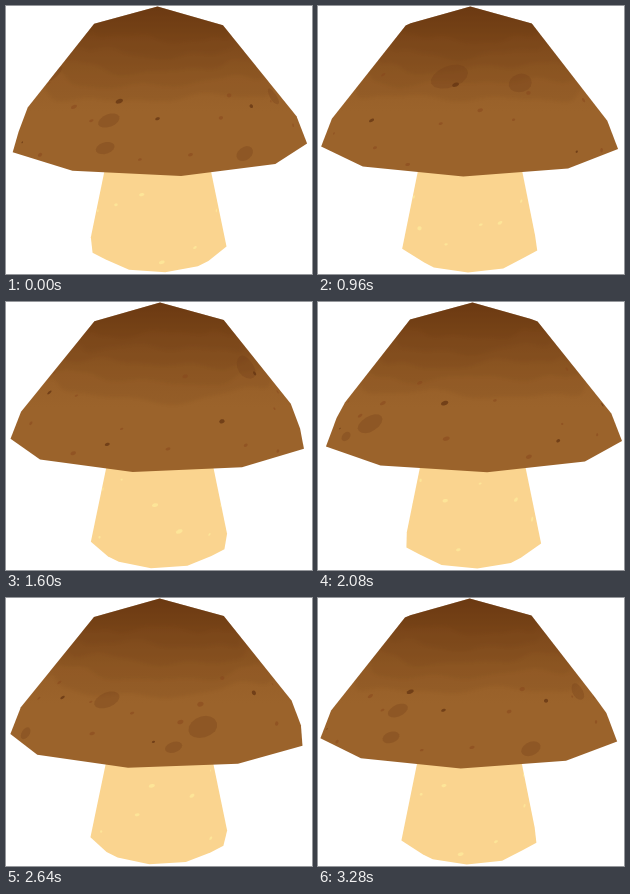
Recreate the animation shown at these times as an HTML page with a canvas. Size 306 by 268 pixels, loop 3360 ms.

```html
<!DOCTYPE html>
<html lang="en">
<head>
<meta charset="utf-8">
<title>Turning mushroom</title>
<style>
  html, body { margin: 0; width: 100%; height: 100%; overflow: hidden; background: #fff; }
  canvas { display: block; }
</style>
</head>
<body>
<canvas id="stage" width="306" height="268"></canvas>
<script>
const ctx = document.getElementById('stage').getContext('2d');
const RAD = Math.PI / 180, SIDES = 10, DISTANCE = 735, HORIZON = -25;
const STEP = 80, LOOP = 3360;

// Profiles from top to bottom: [radius, depth below the horizon]
const CAP = [[0, 25.5], [65.5, 43.5], [136.6, 130.7], [146.6, 156.5]];
const STEM = [[41.6, 130], [69, 260.8], [55.5, 269.5]];

// Large faint patches on the cap: [angle, depth, size]
const PATCHES = [[-109, 83, 16], [-73, 89, 12], [-19, 117, 9], [-18, 137, 8],
                 [31, 144, 9], [67, 108, 11], [94, 141, 7], [105, 127, 13]];

let seed = 11;
function random(from, to) {
  seed = (seed * 16807) % 2147483647;
  return from + (to - from) * seed / 2147483647;
}

const scatter = (count, top, bottom, color) => Array.from({ length: count }, (_, i) => ({
  angle: (i + random(0, 0.8)) * 360 / count * RAD,
  depth: random(top, bottom),
  size: random(1.3, 3.2),
  color: color(i)
}));

const capSpots = [
  ...PATCHES.map(([angle, depth, size]) =>
    ({ angle: angle * RAD, depth, size, color: 'rgba(112, 62, 24, 0.3)' })),
  ...scatter(34, 86, 150, i => i % 4 ? 'rgba(136, 70, 28, 0.5)' : 'rgba(100, 52, 18, 0.75)')
];
const stemSpots = scatter(14, 190, 258, () => '#fde598');

function radiusAt(profile, depth) {
  const i = Math.max(1, profile.findIndex(ring => ring[1] >= depth));
  const [r0, d0] = profile[i - 1], [r1, d1] = profile[i];
  return r0 + (r1 - r0) * (depth - d0) / (d1 - d0);
}

const centre = turn => 152.9 - 1.6 * Math.cos((turn - 30) * RAD);

// One step turns 8.2 degrees; the last part of the loop runs faster
function turnAt(step) {
  return step * 8.2 + Math.max(0, step - 33) * 1.7;
}

function project(radius, depth, angle, cx) {
  const scale = 1 / (1 - radius * Math.cos(angle) / DISTANCE);
  return [cx + radius * Math.sin(angle) * scale, HORIZON + depth * scale];
}

function hull(points) {
  points.sort((a, b) => a[0] - b[0] || a[1] - b[1]);
  const half = list => {
    const out = [];
    for (const p of list) {
      while (out.length > 1) {
        const [a, b] = out.slice(-2);
        if ((b[0] - a[0]) * (p[1] - a[1]) - (b[1] - a[1]) * (p[0] - a[0]) > 0) break;
        out.pop();
      }
      out.push(p);
    }
    return out.slice(0, -1);
  };
  return [...half(points), ...half([...points].reverse())];
}

function fillShape(points, fill) {
  ctx.beginPath();
  points.forEach(([x, y]) => ctx.lineTo(x, y));
  ctx.closePath();
  ctx.fillStyle = fill;
  ctx.fill();
}

function drawBody(profile, turn, fill) {
  const points = [];
  for (const [radius, depth] of profile)
    for (let i = 0; i < SIDES; i++)
      points.push(project(radius, depth, (7.4 + turn + i * 360 / SIDES) * RAD, centre(turn)));
  fillShape(hull(points), fill);
  ctx.clip();
}

function drawSpot(profile, turn, { angle, depth, size, color }) {
  const mid = angle + turn * RAD;
  if (Math.cos(mid) < 0.1) return;
  const points = [];
  for (let i = 0; i < 16; i++) {
    const a = i * Math.PI / 8;
    const d = depth + size * 0.6 * Math.sin(a - 0.3);
    const around = mid + size * Math.cos(a) / radiusAt(profile, depth);
    points.push(project(radiusAt(profile, d), d, around, centre(turn)));
  }
  fillShape(points, color);
}

// Soft, wavy darker layers towards the top of the cap
function drawBands(turn) {
  ctx.filter = 'blur(1.5px)';
  for (let i = 0; i < 5; i++) {
    const points = [[-20, -20]];
    for (let deg = -100; deg <= 100; deg += 4) {
      const a = (deg - turn) * RAD;
      const depth = 52 + 12.5 * i + 3 * Math.sin(3 * a + i) + 2 * Math.sin(7 * a + 2 * i) + Math.sin(13 * a);
      points.push(project(radiusAt(CAP, depth), depth, deg * RAD, centre(turn)));
    }
    points.push([326, -20]);
    fillShape(points, 'rgba(92, 46, 12, 0.085)');
  }
  ctx.filter = 'none';
}

const capFill = ctx.createLinearGradient(0, 0, 0, 105);
['#764217', '#8b5422', '#965e28', '#9b632b']
  .forEach((color, i) => capFill.addColorStop(i / 3, color));

function draw(time) {
  const turn = turnAt(Math.floor(time % LOOP / STEP));
  ctx.fillStyle = '#fff';
  ctx.fillRect(0, 0, 306, 268);

  ctx.save();
  drawBody(STEM, turn, '#fad48f');
  stemSpots.forEach(spot => drawSpot(STEM, turn, spot));
  ctx.restore();

  ctx.save();
  drawBody(CAP, turn, capFill);
  drawBands(turn);
  capSpots.forEach(spot => drawSpot(CAP, turn, spot));
  ctx.restore();
}

const start = performance.now();
function tick() {
  draw(performance.now() - start);
  requestAnimationFrame(tick);
}
tick();
</script>
</body>
</html>
```
